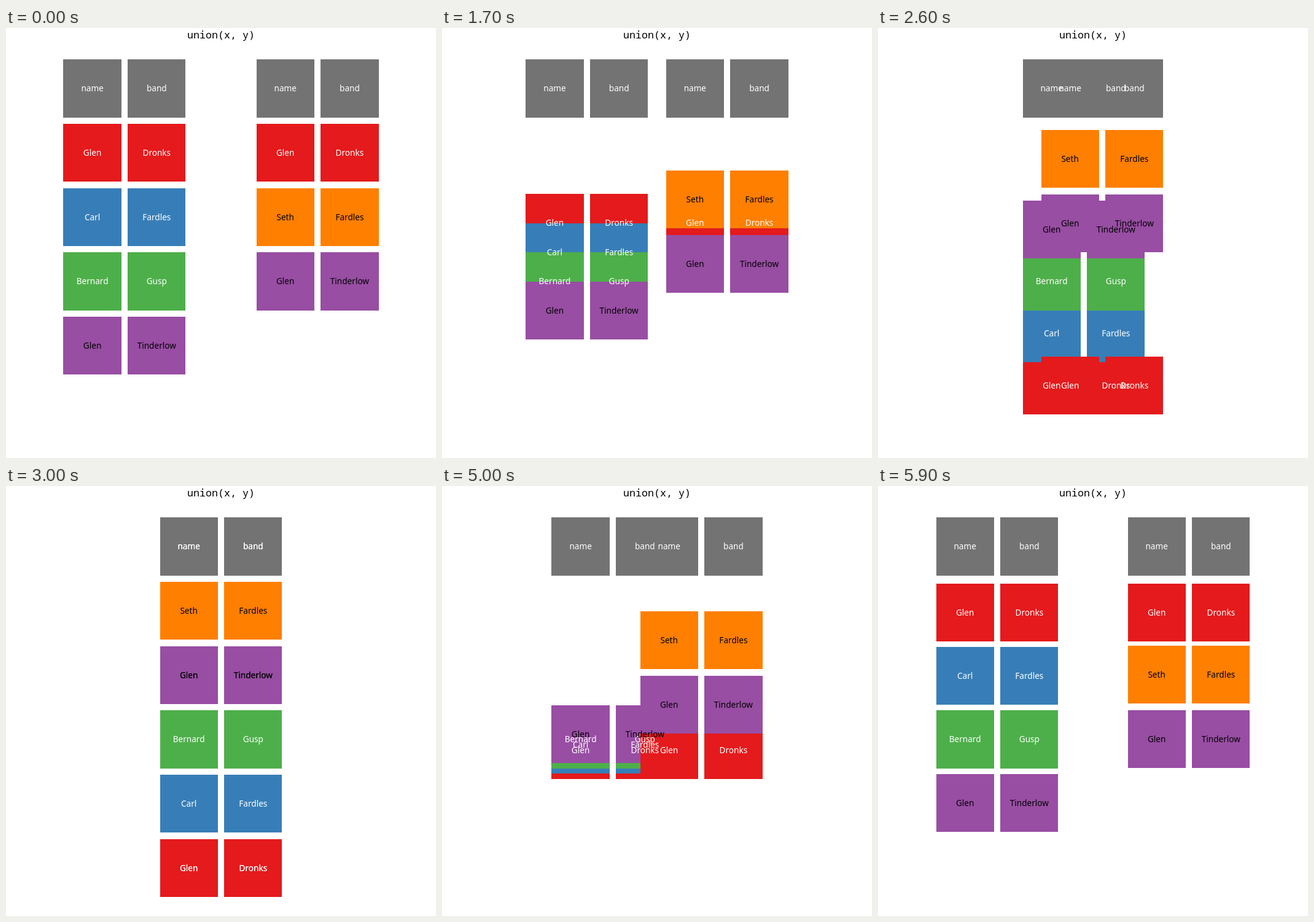
These frames come from a looping animation (700x700 px, 6 s). An HTML page:

```html
<!DOCTYPE html>
<html lang="en">
<head>
<meta charset="utf-8">
<title>union(x, y)</title>
<style>
  html, body { margin: 0; width: 100%; height: 100%; overflow: hidden; background: #fff; }
  svg { display: block; width: 100vw; height: 100vh; }
  text { text-anchor: middle; font: 13.6px "Fira Sans", "Noto Sans", sans-serif; }
  .title { font: 16.67px "Fira Mono", "Noto Sans Mono", monospace; }
</style>
</head>
<body>
<svg viewBox="0 0 700 700">
  <text class="title" x="350" y="17">union(x, y)</text>
  <g id="tiles" shape-rendering="crispEdges"></g>
  <g id="labels"></g>
</svg>
<script>
const PITCH = 104.71, SIZE = PITCH * 0.9, TOP = 51.35;
const LOOP = 6000, STEP = 100;
const GREY = '#737373', RED = '#e41a1c', BLUE = '#377eb8',
      GREEN = '#4daf4a', PURPLE = '#984ea3', ORANGE = '#ff7f00';

// Each row: labels, fill, text colour, start row, row in the union
const header = [['name', 'band'], GREY, '#fff', 0, 0];
const shared = [['Glen', 'Dronks'], RED, '#fff', 1, 5];
const left = [
  header, shared,
  [['Carl', 'Fardles'], BLUE, '#fff', 2, 4],
  [['Bernard', 'Gusp'], GREEN, '#fff', 3, 3],
  [['Glen', 'Tinderlow'], PURPLE, '#000', 4, 2],
];
const right = [
  header, shared,
  [['Seth', 'Fardles'], ORANGE, '#000', 2, 1],
  [['Glen', 'Tinderlow'], PURPLE, '#000', 3, 2],
];

function add(parentId, tag, attrs) {
  const node = document.createElementNS('http://www.w3.org/2000/svg', tag);
  for (const key in attrs) node.setAttribute(key, attrs[key]);
  return document.getElementById(parentId).appendChild(node);
}

// Columns are measured in pitches from the middle of the stage
function makeCells(rows, startCol) {
  return rows.flatMap(([words, fill, ink, fromRow, toRow]) => words.map((word, i) => {
    const rect = add('tiles', 'rect', { fill });
    const label = add('labels', 'text', { fill: ink });
    label.textContent = word;
    return { rect, label, fromRow, toRow, fromCol: startCol + i, toCol: i - 0.5 };
  }));
}

const cells = [...makeCells(left, -2), ...makeCells(right, 1)];
const lerp = (a, b, p) => a + (b - a) * p;
const sineInOut = p => (1 - Math.cos(Math.PI * p)) / 2;

// 20 steps together, a hold, then 19 steps apart
function progress(time) {
  const tick = Math.floor(time / STEP);
  if (tick <= 10) return 0;
  if (tick < 30) return sineInOut((tick - 10) / 20);
  if (tick <= 41) return 1;
  return 1 - sineInOut((tick - 41) / 19);
}

function place(cell, p) {
  const cx = 350 + lerp(cell.fromCol, cell.toCol, p) * PITCH;
  const y = TOP + lerp(cell.fromRow, cell.toRow, p) * PITCH;
  const x0 = Math.round(cx - SIZE / 2), x1 = Math.round(cx + SIZE / 2);
  const y0 = Math.round(y), y1 = Math.round(y + SIZE);
  cell.rect.setAttribute('x', x0);
  cell.rect.setAttribute('y', y0);
  cell.rect.setAttribute('width', x1 - x0);
  cell.rect.setAttribute('height', y1 - y0);
  cell.label.setAttribute('x', cx);
  cell.label.setAttribute('y', y + SIZE / 2 + 4.7);
}

function render() {
  const p = progress(performance.now() % LOOP);
  cells.forEach(cell => place(cell, p));
  requestAnimationFrame(render);
}
render();
</script>
</body>
</html>
```
